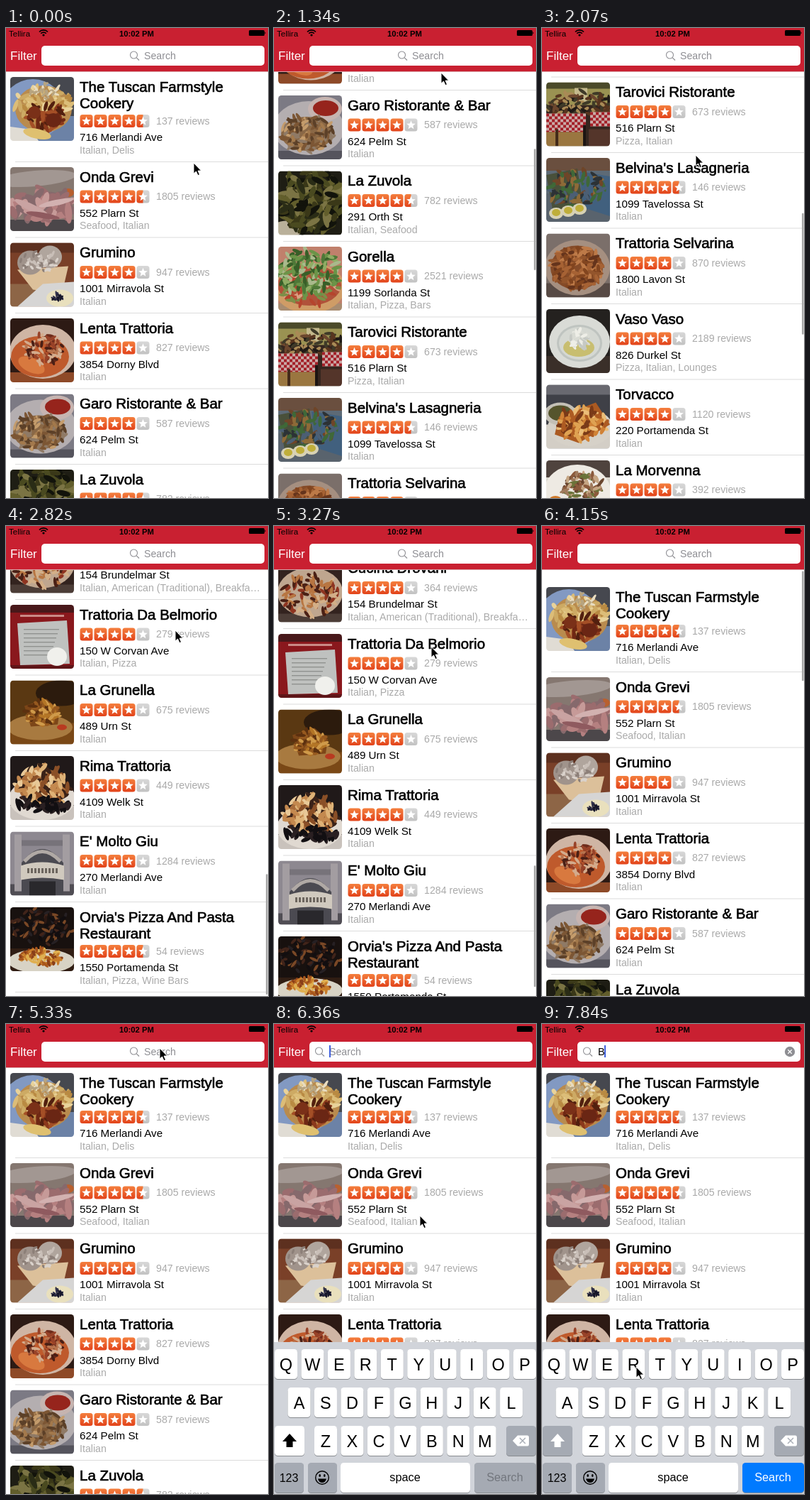
Animation of 370 by 662 pixels, one loop 7990 ms. Source, as an HTML page:

```html
<!DOCTYPE html>
<html lang="en">
<head>
<meta charset="utf-8">
<title>Restaurant list</title>
<style>
html, body { margin: 0; width: 100%; height: 100%; overflow: hidden; background: #fff; }
svg { display: block; }
text { font-family: "Liberation Sans", Arial, sans-serif; white-space: pre; }
</style>
</head>
<body>
<svg id="stage" width="370" height="662" viewBox="0 0 370 662"></svg>
<script>
const TOP = 61, ROW = 106.5, EXTRA = 20.5, LOOP = 7990, STEP = 148;

// Drawing helpers
const text = (x, y, size, fill, s, more = '') =>
  `<text x="${x}" y="${y}" font-size="${size}" fill="${fill}" ${more}>${s.replace('&', '&amp;')}</text>`;
const rect = (x, y, w, h, fill, r = 0, more = '') =>
  `<rect x="${x}" y="${y}" width="${w}" height="${h}" rx="${r}" fill="${fill}" ${more}/>`;
const oval = (fill, x, y, rx, ry = rx, turn = 0) =>
  `<ellipse cx="${x}" cy="${y}" rx="${rx}" ry="${ry}" fill="${fill}" transform="rotate(${turn} ${x} ${y})"/>`;
const path = (d, fill, more = '') => `<path d="${d}" fill="${fill}" ${more}/>`;

function random(seed) {
  return () => (seed = seed * 16807 % 2147483647) / 2147483647;
}

// A heap of short strips in mixed colours
function pile(colors, x, y, rx, ry = rx, n = 60, len = 7) {
  const next = random(Math.round(x * 91 + y * 37 + rx * 13 + n));
  let out = '';
  for (let i = 0; i < n; i++) {
    const a = next() * 6.283, d = Math.sqrt(next());
    const c = colors[Math.floor(next() * colors.length)];
    out += oval(c, (x + Math.cos(a) * d * rx).toFixed(1), (y + Math.sin(a) * d * ry).toFixed(1),
      (len * (.5 + next() * .6)).toFixed(1), (len * .33).toFixed(1), Math.round(next() * 180));
  }
  return out;
}
const ground = (c, low, y = 45) => rect(0, 0, 90, 90, c) + (low ? rect(0, y, 90, 90 - y, low) : '');

const photos = [
  () => ground('#46484f', '#6c82a6', 55) + oval('#8299c2', 32, 45, 44, 42) + path('M0 70L30 74L40 90H0Z', '#e0dcd4') +
    oval('#b98b4e', 47, 45, 40, 33) + pile(['#dcbd78', '#e8d29a', '#b98a42', '#cdaa64'], 45, 36, 40, 24, 70, 9) +
    pile(['#6f2814', '#8b391c', '#52200f', '#a44f26'], 50, 56, 26, 18, 55, 8) + oval('#7a3018', 34, 50, 9) + oval('#6a2614', 61, 61, 11, 10) +
    pile(['#e8dcc0', '#b7a480'], 50, 20, 22, 11, 30, 5) + oval('#dfc070', 38, 80, 20, 7, 12),
  () => ground('#857770', '#4c474a', 74) + oval('#a29792', 35, 16, 58, 11, -5) + oval('#b8602f', 82, 36, 8, 6) +
    pile(['#b58080', '#9b6c6e', '#c69a98', '#86696c'], 42, 55, 48, 20, 60, 15) +
    oval('#c9a3a2', 30, 57, 26, 5, 25) + oval('#d2b1b0', 65, 50, 25, 4, -12) + oval('#8f5a5f', 46, 68, 24, 4, 10),
  () => ground('#7a4028', '#8d6546', 58) + rect(0, 0, 90, 14, '#5d301f') + path('M10 38L82 33L73 72L32 66Z', '#dcc09a') +
    oval('#a0938b', 28, 28, 18, 17) + oval('#b0a59d', 56, 20, 17, 16) + pile(['#c9bfb8', '#8c7f78', '#dad2cb'], 42, 26, 28, 14, 45, 5) +
    path('M10 90L46 58L90 55V90Z', '#d6d5d4') + oval('#e9e0bd', 70, 78, 19, 12) + pile(['#17172a', '#30304a'], 67, 76, 8, 6, 18, 4),
  () => ground('#2d1a14', '#8e4a28', 76) + oval('#cfb5a4', 46, 47, 47, 38) + oval('#bf5a2c', 42, 54, 41, 29) +
    oval('#d8793f', 30, 66, 20, 10, 25) + pile(['#6f2c1c', '#984228', '#4a1f15', '#b8744e', '#d3ab8c'], 48, 43, 26, 21, 90, 6),
  () => ground('#7c7a84', '#55545d', 78) + oval('#b4aeb0', 43, 46, 50, 38) + oval('#c6b4b0', 66, 19, 24, 17) + oval('#96241c', 67, 18, 18, 11) +
    oval('#8a6846', 40, 54, 36, 24) + pile(['#a3794c', '#7c5634', '#c49c6c', '#5c4028', '#8f7a66'], 41, 54, 38, 25, 110, 7),
  () => ground('#1e1d14') + oval('#b9b09a', 12, 82, 22, 12) + pile(['#4a4a20', '#625e2c', '#2a2c16', '#12130b', '#7b7444', '#3a3818'], 47, 42, 46, 43, 190, 12),
  () => ground('#c0806c', '#a88c70', 80) + oval('#cf9c66', 44, 58, 50, 36) + oval('#b0523a', 44, 54, 45, 29) +
    pile(['#d9a283', '#b5442d', '#7d8f48'], 45, 60, 40, 22, 50, 7) + pile(['#4e7838', '#6b9448', '#385f28', '#8fac64', '#a9b98c'], 44, 36, 44, 32, 130, 8),
  () => ground('#9a9252', '#35261f', 32) + rect(0, 0, 90, 9, '#4b4a2a') + rect(40, 8, 18, 20, '#c4b98c') +
    pile(['#3f3a28', '#6c472e', '#a98a56', '#1f1a16', '#57351f'], 46, 32, 46, 20, 90, 7) +
    checks(0, 44, 56, 26) + checks(62, 42, 28, 20) + rect(0, 70, 52, 20, '#9a7640') + rect(13, 66, 4, 24, '#432a1a') + rect(52, 60, 4, 30, '#1c1512') + rect(60, 66, 30, 24, '#54352a'),
  () => ground('#5d6a76', '#59636d', 50) + rect(0, 0, 90, 18, '#6a4f3f') + path('M0 24L44 15L52 66L10 78Z', '#49503a') + path('M47 19L90 26V82L52 70Z', '#41607e') +
    pile(['#6f4528', '#3f6838', '#8e6a38', '#4c5f74', '#2c3236'], 42, 42, 40, 26, 85, 8) +
    [14, 31, 47].map((x, i) => oval('#d8d2b4', x, 78 - i * 3, 10, 8) + oval('#bfae3a', x, 77 - i * 3, 6, 5)).join(''),
  () => ground('#7b6f6a', '#574a45', 70) + oval('#a58f80', 44, 48, 46, 39) + oval('#854b28', 43, 48, 37, 31) +
    pile(['#a66234', '#82451f', '#bd7a48', '#65341c', '#93552c'], 43, 48, 36, 30, 130, 8),
  () => ground('#24211f', '#3a2f29', 66) + oval('#d9dbd6', 47, 46, 43, 37) + oval('#bfc4c0', 47, 48, 32, 26) + oval('#d5d8d2', 47, 48, 29, 23) +
    oval('#c8be70', 46, 54, 22, 13) + pile(['#eeeee7', '#d9dbd4', '#c6c9c4'], 48, 43, 14, 14, 40, 7),
  () => ground('#3f4047', '#d3cec6', 56) + rect(0, 0, 90, 14, '#696970') + oval('#d6d1c8', 48, 60, 46, 28) + oval('#c4c0b6', 20, 41, 23, 16) + oval('#55542c', 20, 40, 17, 11) +
    path('M18 45L70 25L90 56L46 82L12 70Z', '#ab5a22') + pile(['#d08236', '#ad5b22', '#dfa252', '#7a3a18', '#ebbd78'], 51, 54, 34, 21, 80, 9),
  () => ground('#4f433e', '#d9d5cc', 24) + oval('#eeeae3', 44, 44, 47, 38) + oval('#d07a2a', 13, 56, 9, 6) +
    pile(['#a07a5c', '#6a4630', '#c6a684', '#6a7339', '#8b5a3c'], 50, 36, 28, 19, 80, 7),
  () => ground('#5b4536') + oval('#ddd4c6', 45, 46, 42, 35) + pile(['#b8562c', '#d69c57', '#6e7a38'], 45, 46, 28, 23),
  () => ground('#33231f', '#4c3d37', 78) + oval('#bfa68f', 45, 48, 46, 35) + pile(['#8e3420', '#4a2015', '#b87642', '#d3af88'], 45, 52, 42, 29, 110, 7),
  () => ground('#8a181d', '#5e1518', 85) + rect(0, 0, 90, 11, '#48181a') + path('M10 26L80 22L84 83L14 85Z', '#bfc1bf') + rect(14, 14, 62, 3, '#c98a86') +
    [0, 1, 2, 3, 4, 5, 6].map(i => rect(19, 34 + i * 6, 50 - i * 2, 1.4, '#90928f')).join('') + oval('#f0f0ec', 66, 73, 14, 13),
  () => ground('#5a3812', '#7a4816', 60) + oval('#2c1b0d', 72, 18, 36, 18) + oval('#a87a40', 42, 66, 46, 18) +
    path('M20 36L51 26L70 42L67 62L29 65Z', '#7c4618') + pile(['#b37526', '#5c300f', '#96591f', '#cf9a4a'], 45, 46, 24, 17, 70, 7) + oval('#b83a20', 73, 66, 7, 4),
  () => ground('#201919', '#c9c2bc', 70) + oval('#e0d9d1', 45, 60, 47, 30) + oval('#a86b3a', 46, 44, 34, 26) +
    pile(['#c4894f', '#deb277', '#8a4f27', '#e9c998', '#3a2218'], 45, 43, 37, 28, 110, 9) + pile(['#120f12', '#2a2022'], 46, 69, 40, 9, 40, 9),
  () => ground('#8d8890', '#504d54', 74) + rect(6, 4, 10, 80, '#a39da1') + rect(74, 4, 10, 80, '#a39da1') + rect(16, 12, 58, 8, '#77737a') +
    path('M16 44Q45 5 75 44V89H16Z', '#4b4a51') + path('M20 42Q45 14 71 42', 'none', 'stroke="#b0a9a5" stroke-width="5"') +
    path('M15 48Q45 38 76 48V68Q45 62 15 68Z', '#d0c9be') + path('M24 55H67', 'none', 'stroke="#6d665f" stroke-width="7" stroke-dasharray="3 2"') + rect(27, 70, 37, 20, '#29282c'),
  () => ground('#18110f', '#301d13', 58) + pile(['#41241a', '#120e10', '#7a4826', '#262023', '#2a1712'], 45, 27, 46, 26, 80, 6) +
    oval('#d8d3c5', 44, 76, 47, 17) + pile(['#c87c2a', '#a8561d', '#dfaf50', '#8a3f18'], 43, 70, 31, 11, 80, 6),
];

function checks(x, y, w, h) {
  let s = rect(x, y, w, h, '#c9a8a6');
  for (let i = 0; i < w; i += 4) for (let j = 0; j < h; j += 4)
    if ((i + j) % 8 == 0) s += rect(x + i, y + j, 4, 4, '#a31f27');
  return s;
}

// name, reviews, rating, address, categories
const rows = `The Tuscan Farmstyle/Cookery|137|4.5|716 Merlandi Ave|Italian, Delis
Onda Grevi|1805|4.5|552 Plarn St|Seafood, Italian
Grumino|947|4|1001 Mirravola St|Italian
Lenta Trattoria|827|4|3854 Dorny Blvd|Italian
Garo Ristorante & Bar|587|4|624 Pelm St|Italian
La Zuvola|782|4.5|291 Orth St|Italian, Seafood
Gorella|2521|4|1199 Sorlanda St|Italian, Pizza, Bars
Tarovici Ristorante|673|4|516 Plarn St|Pizza, Italian
Belvina's Lasagneria|146|4.5|1099 Tavelossa St|Italian
Trattoria Selvarina|870|4|1800 Lavon St|Italian
Vaso Vaso|2189|4|826 Durkel St|Pizza, Italian, Lounges
Torvacco|1120|4|220 Portamenda St|Italian
La Morvenna|392|4|430 Brindlo St|Italian
Osteria Velmo|518|4|312 Quarl St|Italian
Cucina Drovani|364|4|154 Brundelmar St|Italian, American (Traditional), Breakfa…
Trattoria Da Belmorio|279|4|150 W Corvan Ave|Italian, Pizza
La Grunella|675|4|489 Urn St|Italian
Rima Trattoria|449|4|4109 Welk St|Italian
E' Molto Giu|1284|4|270 Merlandi Ave|Italian
Orvia's Pizza And Pasta/Restaurant|54|4.5|1550 Portamenda St|Italian, Pizza, Wine Bars`
  .split('\n').map(line => line.split('|'));

const starPath = 'M' + Array.from({ length: 10 }, (_, i) => {
  const r = i % 2 ? 2.9 : 6.7, a = i * Math.PI / 5;
  return `${(9 + r * Math.sin(a)).toFixed(2)} ${(9.4 - r * Math.cos(a)).toFixed(2)}`;
}).join('L') + 'Z';

function stars(rating, y) {
  let s = '';
  for (let i = 0; i < 5; i++) {
    const left = rating - i;
    s += `<g transform="translate(${104.5 + i * 20} ${y})">` +
      rect(0, 0, 18, 18, left >= 1 ? 'url(#orange)' : 'url(#grey)', 3.5) +
      (left === .5 ? path('M9 0H3.5Q0 0 0 3.5V14.5Q0 18 3.5 18H9Z', 'url(#orange)') : '') +
      path(starPath, '#fff') + '</g>';
  }
  return s;
}

function buildRows() {
  let y = TOP, out = '';
  rows.forEach(([name, reviews, rating, address, kinds], i) => {
    const lines = name.split('/'), d = (lines.length - 1) * EXTRA;
    out += `<g transform="translate(0 ${y})"><g transform="translate(6 8)" clip-path="url(#round)"><g filter="url(#soft)">${photos[i]()}</g></g>` +
      lines.map((l, n) => text(104, 28.6 + n * 23, 20.5, '#000', l, 'stroke="#000" stroke-width=".65"')).join('') +
      stars(+rating, 40.5 + d) +
      text(212, 54.2 + d, 14.2, '#aaa', reviews + ' reviews') +
      text(104, 77.8 + d, 15.2, '#000', address) +
      text(104, 95.2 + d, 14.2, '#aaa', kinds) +
      rect(13, ROW + d, 357, 1, '#dcdcdc') + '</g>';
    y += ROW + d;
  });
  return out;
}

const lens = path('M9.3 9.3L13 13', 'none', 'stroke="#8e8e93" stroke-width="1.2"') +
  '<circle cx="5.5" cy="5.5" r="5" fill="none" stroke="#8e8e93" stroke-width="1.1"/>';

function buildBar() {
  const arc = r => path(`M${53 - r * .75} ${11.5 - r * .75}A${r} ${r} 0 0 1 ${53 + r * .75} ${11.5 - r * .75}`,
    'none', 'stroke="#000" stroke-width="1.7"');
  return rect(0, 0, 370, TOP, '#c92031') + rect(0, TOP, 370, 1, '#d9a3a8') +
    text(4, 11.5, 11.5, '#000', 'Tellira') + arc(8) + arc(5) + oval('#000', 53, 10, 1.6) +
    text(184.5, 11.5, 11.3, '#000', '10:02 PM', 'font-weight="700" text-anchor="middle"') +
    rect(343, 3, 22, 8, '#000', 1.5) + path('M365.5 5.3Q367.7 7 365.5 8.7Z', '#000') +
    text(6, 45, 17, '#fff', 'Filter') + rect(50, 25, 315, 28, '#fff', 5) +
    `<g id="hint"><g transform="translate(0 -6.5)">${lens}</g>` + text(20, 5, 14.2, '#8e8e93', 'Search', 'id="holder"') + '</g>' +
    text(79, 44, 14.5, '#000', 'B', 'id="typed"') + rect(88, 30, 2, 17, '#4060dd', 0, 'id="caret"') +
    '<g id="clear">' + oval('#8e8e93', 350, 39, 7.2) +
    path('M347.3 36.3L352.7 41.7M352.7 36.3L347.3 41.7', 'none', 'stroke="#fff" stroke-width="1.3"') + '</g>';
}

function buildKeys() {
  const key = (x, y, w, fill, id) => rect(x, y + 1, w, 42, '#898c90', 4.5) + rect(x, y, w, 42, fill, 4.5, id ? `id="${id}"` : '');
  const mid = 'text-anchor="middle"';
  let s = rect(0, 448, 370, 214, '#d1d4da');
  [['QWERTYUIOP', 17], ['ASDFGHJKL', 35.5], ['ZXCVBNM', 73]].forEach(([letters, x], row) => {
    [...letters].forEach((c, i) => {
      const cx = x + i * 37.45, y = 458 + row * 54;
      s += key(cx - 16, y, 32, '#fff') + text(cx, y + 29.5, 23.5, '#000', c, mid);
    });
  });
  return s + key(1, 566, 42, '#a5aab3', 'shift') + path('M22 577L32 588H26.5V596H17.5V588H12Z', '#fff', 'id="arrow"') +
    key(328, 566, 42, '#a5aab3') + path('M337 587L344 579.5H358Q360 579.5 360 582V592Q360 594.5 358 594.5H344Z', '#fff') +
    path('M347 583L355 591M355 583L347 591', 'none', 'stroke="#a5aab3" stroke-width="1.4"') +
    key(1, 618, 41, '#a5aab3') + text(21, 644.5, 16, '#000', '123', mid) +
    key(48, 618, 41, '#a5aab3') + '<circle cx="68" cy="639" r="9.3" fill="none" stroke="#000" stroke-width="1.4"/>' +
    oval('#000', 64.7, 636, 1.3, 1.9) + oval('#000', 71.3, 636, 1.3, 1.9) + path('M62 640.5H74Q72.5 646 68 646T62 640.5Z', '#000') +
    key(94, 618, 183, '#fff') + text(185, 644, 16.3, '#000', 'space', mid) +
    key(283, 618, 87, '#007aff', 'go') + text(326, 644, 16.3, '#fff', 'Search', mid + ' id="goText"');
}

const fade = (id, a, b) =>
  `<linearGradient id="${id}" x2="0" y2="1"><stop stop-color="${a}"/><stop offset="1" stop-color="${b}"/></linearGradient>`;
const stage = document.getElementById('stage');
stage.innerHTML = `<defs>${fade('orange', '#f47f3e', '#e2431a')}${fade('grey', '#d8d8d8', '#c2c2c2')}
  <clipPath id="round"><rect width="90" height="90" rx="4.5"/></clipPath>
  <filter id="soft" x="0" y="0" width="1" height="1"><feGaussianBlur stdDeviation=".7"/></filter></defs>
  <rect width="370" height="662" fill="#fff"/><g id="list">${buildRows()}</g>
  ${rect(367, 0, 2.6, 170, '#a9a9a9', 1.3, 'id="thumb"')}
  ${buildBar()}<g id="keys">${buildKeys()}</g>
  <g id="pointer">${path('M0 0V15.2L3.5 12L6 17.6L8.5 16.5L6.1 11.1H10.7Z', '#000', 'stroke="#fff" stroke-width="1"')}</g>`;
const el = Object.fromEntries([...stage.querySelectorAll('[id]')].map(n => [n.id, n]));

// Keyed by step: [step, values...]
const scrollKeys = [[6, 0], [7, 45], [8, 235], [9, 420.5], [10, 535], [11, 620], [12, 682], [13, 726], [14, 758.5],
  [15, 780], [16, 815], [17, 1010], [18, 1400], [19, 1576], [20, 1573], [21, 1570], [22, 1535], [23, 1230],
  [24, 560], [25, -103.5], [26, -78], [27, -40], [28, -17], [29, -7], [30, -2], [31, 0]];
const pointerKeys = [[0, 265, 190], [1, 252, 255], [2, 222, 375], [3, 189, 470], [4, 177, 495], [6, 177, 495],
  [7, 184, 440], [8, 210, 250], [9, 236, 63], [12, 233, 70], [14, 217, 179], [15, 208, 330], [16, 206, 420],
  [17, 216, 290], [18, 234, 155], [19, 239, 147], [21, 226, 140], [22, 222, 170], [23, 225, 390], [24, 230, 640],
  [25, 235, 720], [29, 238, 690], [32, 228, 260], [34, 218, 41], [35, 218, 41], [36, 217, 34], [39, 217, 34],
  [43, 206, 270], [48, 222, 600], [50, 222, 600], [53, 133, 483]];
const hintKeys = [[37, 175], [38, 130], [39, 70], [40, 58]];
const keyboardKeys = [[37, 214], [38, 170], [39, 50], [40, 0]];

function at(keys, step) {
  const n = keys.findIndex(k => k[0] > step);
  if (n === 0) return keys[0].slice(1);
  if (n < 0) return keys[keys.length - 1].slice(1);
  const a = keys[n - 1], b = keys[n], p = (step - a[0]) / (b[0] - a[0]);
  return a.slice(1).map((v, i) => v + (b[i + 1] - v) * p);
}
const move = (node, x, y) => node.setAttribute('transform', `translate(${x} ${y})`);
const show = (node, on) => node.setAttribute('visibility', on ? 'visible' : 'hidden');
const paint = (node, fill) => node.setAttribute('fill', fill);

function draw(step) {
  const [scroll] = at(scrollKeys, step), [x, y] = at(pointerKeys, step);
  move(el.list, 0, -scroll);
  move(el.pointer, x, y);

  const top = scroll < 0 ? 63.5 : Math.max(63.5, TOP + scroll * (.255 + scroll * .000011));
  el.thumb.setAttribute('y', top);
  el.thumb.setAttribute('height', Math.min(171 + Math.min(0, scroll) * .95, 660 - top));
  el.thumb.setAttribute('opacity', step < 7 ? 0 : Math.max(0, Math.min(1, (33 - step) / 3)));

  const focused = step >= 38, typed = step >= 50;
  move(el.hint, at(hintKeys, step)[0], 39);
  move(el.keys, 0, at(keyboardKeys, step)[0]);
  show(el.keys, focused);
  show(el.holder, !typed);
  show(el.typed, typed);
  show(el.clear, typed);
  const blink = (step - (typed ? 50 : 40)) * STEP % 1000 < 560;
  show(el.caret, step >= 40 && blink);
  el.caret.setAttribute('x', typed ? 88 : 78);
  paint(el.shift, typed ? '#a5aab3' : '#fff');
  paint(el.arrow, typed ? '#fff' : '#000');
  paint(el.go, typed ? '#007aff' : '#a5aab3');
  paint(el.goText, typed ? '#fff' : '#72767d');
}

const start = performance.now();
let last = -1;
function tick() {
  const t = (performance.now() - start) % LOOP;
  const step = Math.min(53, Math.floor((t + 10) / STEP));
  if (step !== last) draw(last = step);
  requestAnimationFrame(tick);
}
tick();
</script>
</body>
</html>
```
